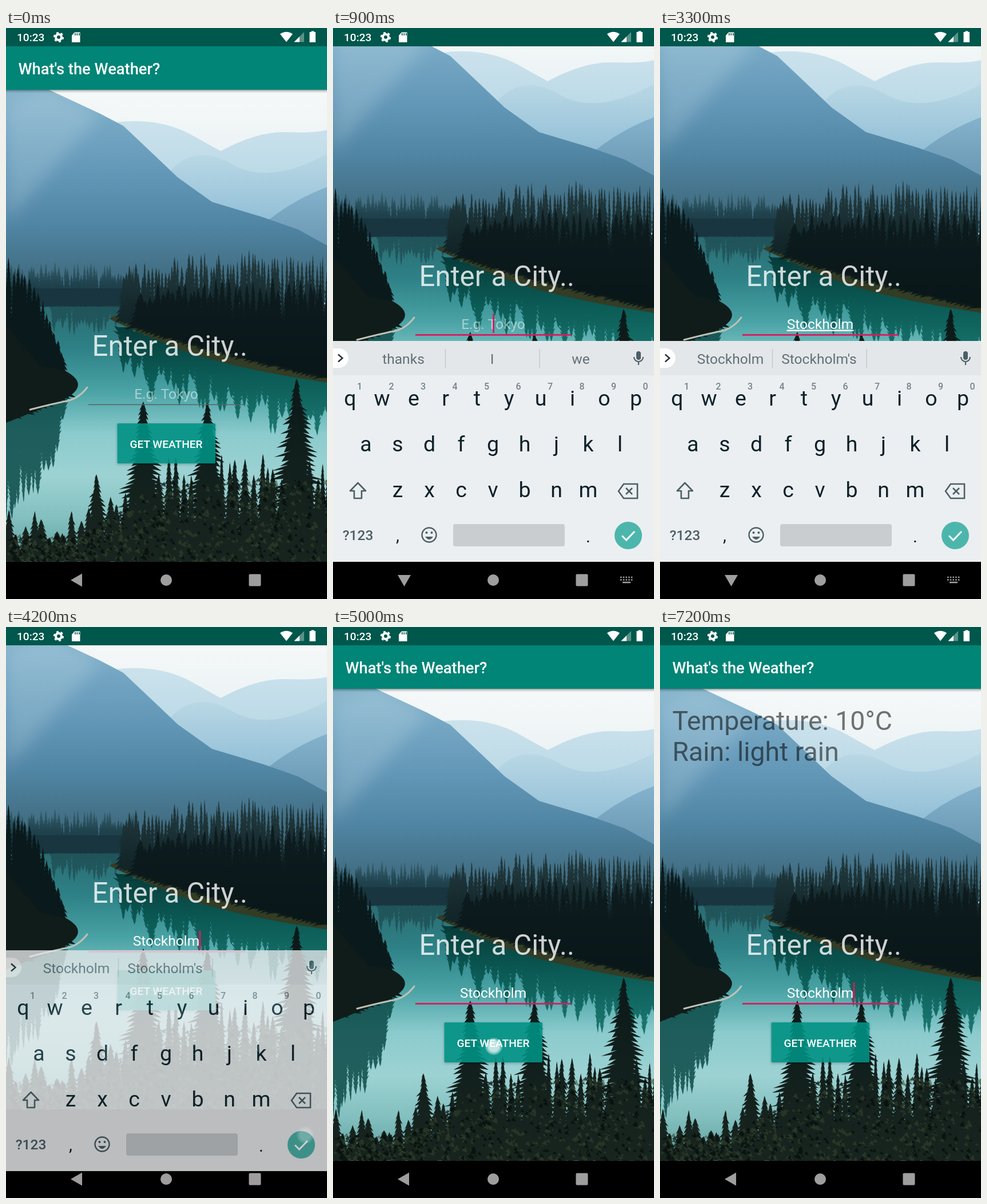
Animation of 561x998 px, one loop 7600 ms. Source, as an HTML page:

```html
<!DOCTYPE html>
<html lang="en">
<head>
<meta charset="utf-8">
<title>What's the Weather?</title>
<style>
  html, body { margin: 0; width: 100%; height: 100%; overflow: hidden; background: #000; }
  svg { display: block; font-family: Roboto, sans-serif; }
  .mid { text-anchor: middle; }
  .bold { font-weight: 500; }
</style>
</head>
<body>
<svg id="stage" width="561" height="998" viewBox="0 0 561 998"></svg>
<script>
const LOOP = 7600, STEP = 100, BLINK = 500, PAN = 122;
const ACCENT = '#d81b60', INK = '#0d212a', SOFT = '#4c5f67';
const WORD = 'Stockholm';
const TYPED_AT = [1400, 1500, 1800, 1900, 2000, 2300, 2500, 2600, 2800];
const CARET_RESETS = [500, ...TYPED_AT, 4200];

let seed = 11;
const rand = () => (seed = (seed * 16807) % 2147483647) / 2147483647;
const range = n => [...Array(n).keys()];
const clamp = v => Math.max(0, Math.min(1, v));
const progress = (t, start, length) => clamp((t - start) / length);
const easeInOut = p => p < .5 ? 4 * p ** 3 : 1 - (2 - 2 * p) ** 3 / 2;
const within = (t, start, end) => t >= start && t < end;

// ---- markup helpers
const path = (d, fill, extra = '') => `<path d="${d}" fill="${fill}" ${extra}/>`;
const line = (d, color, width, extra = '') => path(d, 'none', `stroke="${color}" stroke-width="${width}" ${extra}`);
const rect = (x, y, w, h, fill, extra = '') =>
  `<rect x="${x}" y="${y}" width="${w}" height="${h}" fill="${fill}" ${extra}/>`;
const circle = (x, y, r, fill, extra = '') => `<circle cx="${x}" cy="${y}" r="${r}" fill="${fill}" ${extra}/>`;
const text = (x, y, size, fill, str, extra = '') =>
  `<text x="${x}" y="${y}" font-size="${size}" fill="${fill}" ${extra}>${str}</text>`;
const gradient = (id, y1, y2, ...colors) =>
  `<linearGradient id="${id}" gradientUnits="userSpaceOnUse" x1="0" x2="0" y1="${y1}" y2="${y2}">` +
  colors.map((c, i) => `<stop offset="${i / (colors.length - 1)}" stop-color="${c}"/>`).join('') +
  '</linearGradient>';

// ---- landscape
// A fir silhouette; a base above the tip draws its reflection.
function fir(x, tip, base, width) {
  const h = base - tip, n = Math.max(5, Math.round(Math.abs(h) / 8));
  const side = dir => range(n).flatMap(i => {
    const f = (i + 1) / n, half = dir * width / 2 * f ** .8 * (.7 + .6 * rand()), y = tip + h * f;
    return [[x + half, y], [x + half * .5, y - h / n * .3]];
  });
  const points = [[x, tip], ...side(1), ...side(-1).reverse()];
  return 'M' + points.map(p => p.map(v => v.toFixed(1))).join('L') + 'Z';
}

function forest(from, to, step, width, tip, base) {
  let d = '';
  for (let x = from; x <= to; x += step * (.6 + .8 * rand())) d += fir(x, tip(x), base(x), width * (.7 + .6 * rand()));
  return d;
}

const shore = x => 508 + 110 * clamp((x - 180) / 381) ** .8;
const forestTop = x => 386 + 30 * ((x - 420) / 215) ** 2;
const leftTop = x => 400 + 200 * (x / 105) ** 2.4;
const leftBank = x => 685 - x * .4;
const bushTop = x => 890 - 100 * clamp((x - 120) / 160);

const hill = (crest, fill) => path(`M${crest}V480H0Z`, fill);

const leaves = count => range(count).map(() => {
  const x = rand() * 561, y = 933 - rand() * (933 - bushTop(x)), r = 2 + rand() * 5;
  return `M${x.toFixed()} ${y.toFixed()}l${r.toFixed(1)} -${r.toFixed(1)} 3 ${(r * 1.6).toFixed(1)}z`;
}).join('');

const landscape = () =>
  gradient('sky', 100, 330, '#f7f9f9', '#ecf3f5', '#cbe3ed') +
  gradient('far', 165, 330, '#cbe2ec', '#afd3e3') +
  gradient('mid', 220, 340, '#bad8e5', '#90bed6') +
  gradient('near', 280, 400, '#84b1cb', '#6594b0') +
  gradient('big', 90, 430, '#8ab8ce', '#74a6c3', '#6296b6', '#5085a3', '#426e83') +
  gradient('lake', 484, 933, '#2c6a70', '#2d8186', '#49a2a4', '#8bcbcd', '#9dd2d3', '#82bfbe', '#5c9f9d') +
  gradient('haze', 405, 490, '#3b6675', '#1f424d', '#183540') +
  gradient('wood', 380, 600, '#263f44', '#14282b', '#0a1719') +
  gradient('reflect', 520, 690, '#073a38', '#0b5a55', '#18736c') +
  gradient('fore', 610, 933, '#0a1918', '#12201d', '#18241e') +
  rect(0, 20, 561, 913, 'url(#sky)') +
  hill('190 165Q270 155 330 190L375 215Q440 180 490 182T561 178', 'url(#far)') +
  hill('285 252Q330 200 395 238T561 220', 'url(#mid)') +
  hill('440 352Q490 305 561 278', 'url(#near)') +
  hill('0 78L75 108 165 150 205 171 240 204 300 261 360 304 450 331 510 352 561 380', 'url(#big)') +
  path('M75 108L165 150 0 340V130Z', '#dff0f6', 'opacity=".2" filter="url(#soft)"') +
  rect(0, 484, 561, 449, 'url(#lake)') +
  path(forest(0, 225, 5, 17, () => 408 + 26 * rand(), () => 488), 'url(#haze)') +
  rect(0, 455, 230, 32, '#183540') +
  path(forest(84, 205, 6, 15, () => 510 + 28 * rand(), () => 485), '#1d4d52', 'opacity=".75"') +
  path(forest(205, 561, 9, 34, x => shore(x) + 50 + 65 * rand(), shore), 'url(#reflect)') +
  path(forest(0, 105, 8, 34, x => leftBank(x) + .7 * (680 - leftTop(x)) - 40 * rand(), leftBank), '#0b4b48', 'opacity=".85"') +
  path('M180 508Q195 498 230 508L561 598V620Q380 592 300 560T180 508Z', '#333c24') +
  path(forest(206, 575, 6, 24, x => forestTop(x) + 30 * rand(), x => shore(x) - 6), 'url(#wood)') +
  path(forest(235, 575, 9, 36, x => forestTop(x) + 45 + 30 * rand(), x => shore(x) - 4), '#0a1719', 'opacity=".8"') +
  path(forest(-5, 105, 7, 44, x => leftTop(Math.max(0, x)) + 25 * rand(), leftBank), '#0a191b') +
  path('M0 520L60 590 105 600Q150 625 98 651L0 690Z', '#101c19') +
  line('M42 667Q85 656 106 652T142 628', '#bfc0b4', 3, 'stroke-linecap="round"') +
  path(forest(-5, 575, 13, 42, x => bushTop(x) - 50 * rand(), () => 935), 'url(#fore)') +
  path([[158, 780], [240, 653], [352, 655], [508, 613]].map(([x, tip]) =>
    fir(x, tip, 935, .38 * (935 - tip))).join(''), 'url(#fore)') +
  path(leaves(450), '#35452f', 'opacity=".55"') +
  path(leaves(350), '#050c0b', 'opacity=".7"');

// ---- screen parts
const content = () => `<g id="content">${landscape()}
  ${text(286.2, 573, 49.1, 'rgba(255,255,255,.8)', 'Enter a City..', 'class="mid"')}
  ${rect(144, 657.5, 272, 1.6, '#56696a', 'id="rule"')}
  ${text(280, 647.5, 24.57, 'rgba(255,255,255,.5)', 'E.g. Tokyo', 'id="hint" class="mid"')}
  ${text(280, 647.5, 24.57, '#fff', '', 'id="entry" class="mid"')}
  ${rect(0, 621.5, 2.8, 33.5, ACCENT, 'id="caret"')}
  ${rect(194, 692, 172, 71, '#000', 'opacity=".22" filter="url(#shade)"')}
  ${rect(194.5, 691, 171.5, 70, '#009688', 'opacity=".87" rx="2"')}
  ${rect(194.5, 691, 171.5, 70, '#fff', 'id="ripple" opacity="0" rx="2"')}
  ${text(280, 734, 19.1, '#fff', 'GET WEATHER', 'class="mid bold"')}
  <g id="report">${text(21.5, 180, 46.4, 'rgba(0,0,0,.54)', 'Temperature: 10°C')}
  ${text(21.5, 234, 46.4, 'rgba(0,0,0,.54)', 'Rain: light rain')}</g>
  ${rect(-9, 60, 579, 50, '#000', 'opacity=".4" filter="url(#shade)"')}
  ${rect(0, 20, 561, 88, '#008577')}
  ${text(21.5, 81, 27.3, '#fff', "What's the Weather?", 'class="bold"')}</g>`;

const statusBar = () => rect(0, 0, 561, 32, '#00574b') +
  text(19, 23, 19.1, '#fff', '10:23', 'class="bold"') +
  circle(92, 16, 5, 'none', 'stroke="#fff" stroke-width="4"') +
  circle(92, 16, 7.6, 'none', 'stroke="#fff" stroke-width="3" pathLength="16" stroke-dasharray="1.3 1.367"') +
  path('M115 13L120 7.5H129.5V25H115Z', '#fff') +
  line('M120 11H129', '#00574b', 4, 'stroke-dasharray="1.6 1.9"') +
  path('M479 10.5Q490 3 501 10.5L490 24.5Z', '#fff') +
  path('M521 7V24.5H503.5Z', '#fff', 'opacity=".35"') +
  path('M513 15V24.5H503.5Z', '#fff') +
  path('M533.5 7V5.5H538.5V7H541V25H530.5V7Z', '#fff');

const navIcons = () => '<g opacity=".62">' +
  path('M113 965L133 953.5V976.5Z', '#fff', 'id="back"') +
  path('M113 956H136L124.5 976Z', '#fff', 'id="down"') +
  circle(280, 965, 10, '#fff') + rect(424.5, 954.5, 21, 21, '#fff', 'rx="2"') +
  '<g id="switcher">' + line('M502 960H524M502 964.5H524', '#fff', 2.6, 'stroke-dasharray="2.6 2.1"') +
  line('M506 969H520', '#fff', 2.6) + '</g></g>';

function keyboard() {
  const row = (chars, x, y, size, fill, cls) => [...chars].map((c, i) =>
    text(x + i * 55.5, y, size, fill, c, `class="mid ${cls}"`)).join('');
  const keys = (chars, x, y) => row(chars, x, y, 37.5, INK, 'letter');
  return '<g id="keyboard">' + rect(0, 547, 561, 386, '#eceff1') + rect(0, 547, 561, 60, '#e4e7e9') +
    path('M0 560H10A17 17 0 0 1 10 594H0Z', '#fff') + line('M9 570.5L16.5 577 9 583.5', '#263238', 2.4) +
    line('M196.5 561V594M361 561V594', '#c3c9cc', 1.5) +
    [123, 278, 433].map(x => text(x, 587, 24.57, '#637077', '', 'class="mid suggestion"')).join('') +
    rect(530, 565, 8, 15, SOFT, 'rx="4"') + line('M526 575A8 8 0 0 0 542 575M534 583V589', SOFT, 2.2) +
    keys('qwertyuiop', 30, 660) + keys('asdfghjkl', 57.5, 740) + keys('zxcvbnm', 113, 820) +
    row('1234567890', 46.5, 632, 16, '#75838a', 'bold') +
    path('M43.5 795L57 809H50V822H37V809H30Z', 'none',
      `id="shift" stroke="${SOFT}" stroke-width="2.6" stroke-linejoin="round"`) +
    line('M508 797H532V822H508L499 809.5ZM512 804L523 815M523 804L512 815', SOFT, 2.6) +
    text(43.5, 895, 24.5, SOFT, '?123', 'class="mid bold"') +
    text(113, 897, 30, INK, ',', 'class="mid"') + text(446, 899, 30, INK, '.', 'class="mid"') +
    circle(168, 886, 12.5, 'none', `stroke="${SOFT}" stroke-width="2.4"`) +
    circle(163.5, 882, 2, SOFT) + circle(172.5, 882, 2, SOFT) + path('M161 889H175Q168 899 161 889Z', SOFT) +
    rect(210, 867, 195, 39, '#c9cdd0', 'rx="4"') + circle(516, 887, 24, '#4db6ac') +
    line('M505 887.5L512.5 895 527 880', '#fff', 3) + '</g>';
}

const stage = document.getElementById('stage');
stage.innerHTML = `<defs>
  <filter id="shade" x="-10%" y="-30%" width="120%" height="160%"><feGaussianBlur stdDeviation="2"/></filter>
  <filter id="soft" x="-20%" y="-20%" width="140%" height="140%"><feGaussianBlur stdDeviation="14"/></filter>
  <radialGradient id="touch"><stop offset=".6" stop-color="#fff"/><stop offset="1" stop-color="#fff" stop-opacity=".25"/></radialGradient>
  </defs>` + rect(0, 0, 561, 998, '#000') + content() + rect(0, 933, 561, 65, '#000') +
  statusBar() + keyboard() + navIcons() + circle(0, 0, 15, 'url(#touch)', 'id="tap"');

// ---- animation
const $ = id => document.getElementById(id);
const set = (id, attrs) => Object.entries(attrs).forEach(([k, v]) => $(id).setAttribute(k, v));
const show = (id, on) => { $(id).style.display = on ? '' : 'none'; };
const letters = [...stage.querySelectorAll('.letter')].map(el => [el, el.textContent]);
const suggestions = stage.querySelectorAll('.suggestion');

const TAPS = [
  { x: 281, y: 640, start: 300 },
  { x: 523, y: 888, start: 3900 },
  { x: 281, y: 733, start: 5000 }
];

function suggest(word) {
  if (!word) return ['thanks', 'I', 'we'];
  if (word === WORD) return [word, word + "'s", ''];
  if (word.length > 5) return [word, WORD, word.length > 6 ? WORD + "'s" : WORD];
  return [word, 'Stock', 'Stocking'];
}

function draw(t) {
  const focused = t >= 400, shifted = within(t, 1300, 1500), typing = within(t, 600, 4100);
  const word = WORD.slice(0, TYPED_AT.filter(at => t >= at).length);

  const pan = PAN * (easeInOut(progress(t, 395, 400)) - easeInOut(progress(t, 4040, 400)));
  set('content', { transform: `translate(0 ${-Math.round(pan)})` });

  const hidden = t < 2000 ? (1 - progress(t, 700, 200)) ** 2 : progress(t, 4040, 350) ** 2;
  set('keyboard', { transform: `translate(0 ${Math.round(84 * hidden)})`, opacity: 1 - hidden });

  set('rule', focused ? { y: 657, height: 2.8, fill: ACCENT } : { y: 657.5, height: 1.6, fill: '#56696a' });
  show('hint', !word);
  $('entry').textContent = word;
  set('entry', { 'text-decoration': t < 3900 ? 'underline' : 'none' });
  set('caret', { x: 279.2 + $('entry').getComputedTextLength() / 2 });
  const reset = CARET_RESETS.findLast(at => t >= at);
  show('caret', Math.floor((t - reset) / BLINK) % 2 === 0);

  letters.forEach(([el, c]) => { el.textContent = shifted ? c.toUpperCase() : c; });
  set('shift', { fill: shifted ? SOFT : 'none' });
  suggest(word).forEach((s, i) => { suggestions[i].textContent = s; });

  show('back', !typing);
  show('down', typing);
  show('switcher', typing);

  const tap = TAPS.find(({ start }) => within(t, start, start + 400));
  show('tap', tap);
  if (tap) set('tap', { cx: tap.x, cy: tap.y, opacity: .75 * (1 - progress(t, tap.start + 100, 300)) });
  set('ripple', { opacity: t < 5100 ? 0 : .2 * (1 - progress(t, 5100, 300)) });
  show('report', t >= 5300);
}

function frame() {
  draw(Math.floor(performance.now() % LOOP / STEP) * STEP);
  requestAnimationFrame(frame);
}
frame();
</script>
</body>
</html>
```
